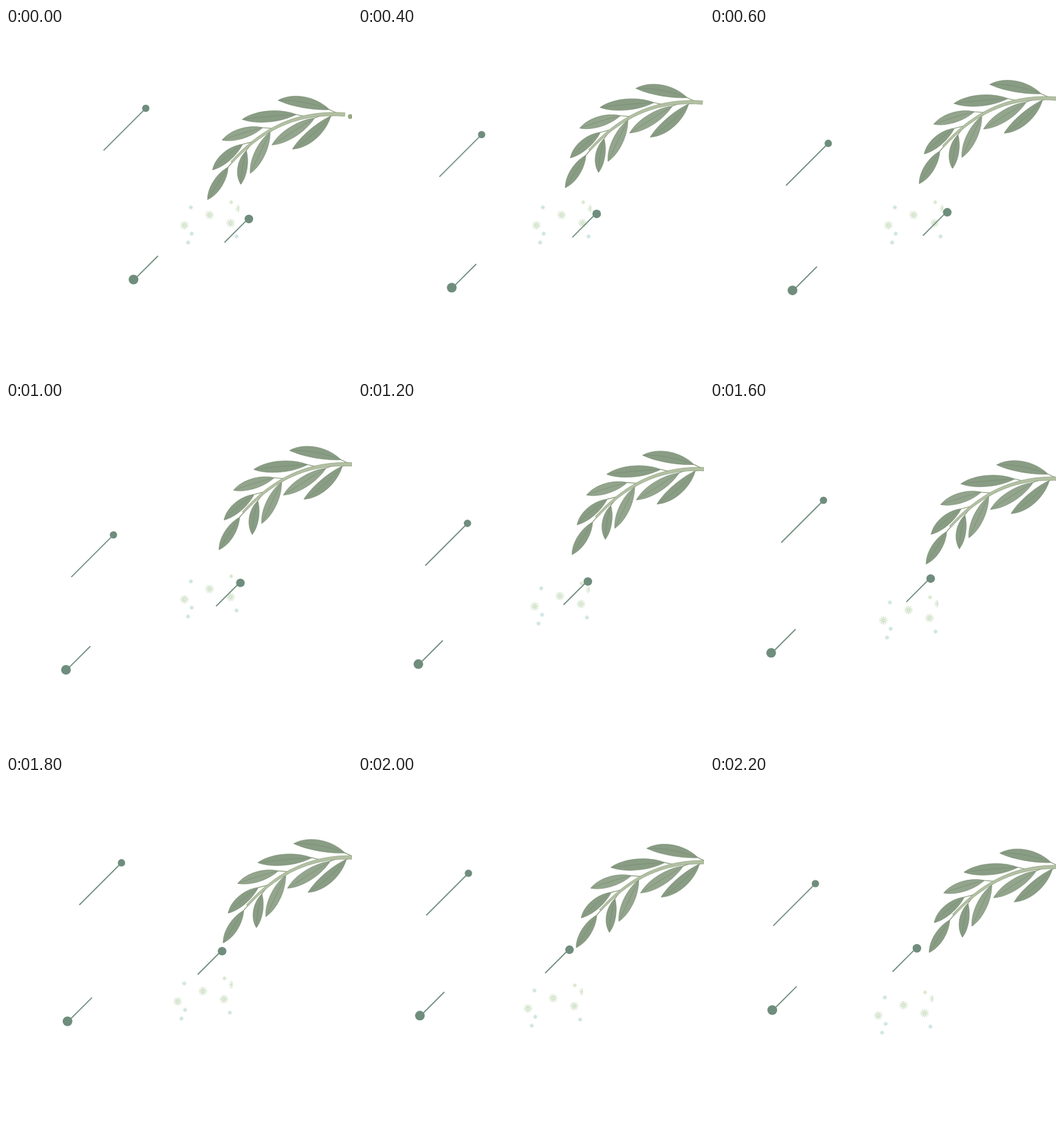
Recreate the animation shown at these times as an HTML page. Size 500 px wide and 500 px high, loop 3200 ms.

```html
<!DOCTYPE html>
<html lang="en">
<head>
<meta charset="utf-8">
<title>Olive branch</title>
<style>
  html, body { margin: 0; width: 100%; height: 100%; overflow: hidden; background: #fff; }
  svg { display: block; width: 100%; height: 100%; }
</style>
</head>
<body>
<svg id="stage" viewBox="0 0 500 500"></svg>
<script>
const LOOP = 3200, STEP = 200, LAST = 11;
const GREEN = '#6f8d7d';
const stage = document.getElementById('stage');

function add(parent, tag, attrs = {}) {
  const el = document.createElementNS('http://www.w3.org/2000/svg', tag);
  for (const key in attrs) el.setAttribute(key, attrs[key]);
  return parent.appendChild(el);
}

function stroke(parent, d, color, width) {
  return add(parent, 'path', { d, stroke: color, 'stroke-width': width, fill: 'none' });
}

// Starburst of thin rays; the small ones have a soft core
function flake(parent, x, y, r, color) {
  const big = r > 4, rays = big ? 12 : 8;
  let d = '';
  for (let i = 0; i < rays; i++) {
    const c = Math.cos(i * 2 * Math.PI / rays), s = Math.sin(i * 2 * Math.PI / rays);
    d += `M${x + c} ${y + s}L${x + c * r} ${y + s * r}`;
  }
  stroke(parent, d, color, 0.85);
  if (!big) add(parent, 'circle', { cx: x, cy: y, r: r * 0.6, fill: color, opacity: 0.6 });
}

function flakes() {
  const g = add(stage, 'g');
  const clip = add(add(g, 'defs'), 'clipPath', { id: 'edge' });
  add(clip, 'rect', { x: 240, y: 240, width: 97.2, height: 90 });
  const inner = add(g, 'g', { 'clip-path': 'url(#edge)' });
  for (const [x, y] of [[257.8, 285.2], [294.2, 270.2], [324.6, 281.8], [338, 261]]) {
    flake(inner, x, y, 6.2, '#bdd6b2');
  }
  for (const [x, y] of [[267.2, 259.2], [268.4, 297.3], [263.2, 310], [333.2, 301.3]]) {
    flake(inner, x, y, 3.3, '#bcdcda');
  }
  flake(inner, 325.4, 251.8, 3, '#cbdfb7');
  return g;
}

// Pin: round head at x, y and a 45 degree needle ending at x + dx, y + dy
function pin(x, y, r, dx, dy) {
  const g = add(stage, 'g');
  const run = Math.min(Math.abs(dx), Math.abs(dy));
  const d = `M${x + dx} ${y + dy}l${-Math.sign(dx) * run} ${-Math.sign(dy) * run}`;
  stroke(g, d, GREEN, 1.7);
  add(g, 'circle', { cx: x, cy: y, r, fill: GREEN });
  return g;
}

// Point on the stem, t = 0 at the thin end and 1 at the cut end
function stem(t) {
  const s = 1 - t;
  const mix = (a, b, c, d) => s * s * s * a + 3 * s * s * t * b + 3 * s * t * t * c + t * t * t * d;
  return [mix(326, 375, 430, 500), mix(194, 140, 118, 126)];
}

function stemPath() {
  const upper = [], lower = [];
  for (let t = 0; t <= 1; t += 0.05) {
    const [x, y] = stem(t), [x2, y2] = stem(t + 0.01);
    const k = (1.5 + 1.1 * t) / Math.hypot(x2 - x, y2 - y);
    const nx = (y2 - y) * k, ny = (x - x2) * k;
    upper.push([x + nx, y + ny]);
    lower.unshift([x - nx, y - ny]);
  }
  return `M${upper.concat(lower).join('L')}Z`;
}

// Twig from a leaf base to the stem, a little towards its root
function twig(x, y) {
  let best = 0, near = Infinity;
  for (let t = 0; t < 1; t += 0.01) {
    const [sx, sy] = stem(t), dist = Math.hypot(sx - x, sy - y);
    if (dist < near) { near = dist; best = t; }
  }
  return `M${x} ${y}L${stem(Math.min(1, best + 0.07))}`;
}

// Leaf between tip and base; bow bends it sideways
function leaf(parent, tx, ty, bx, by, bow, fill) {
  const dx = bx - tx, dy = by - ty, len = Math.hypot(dx, dy);
  const half = 6.3 + len * 0.055;
  const at = (k, off) => `${tx + dx * k + dy / len * off} ${ty + dy * k - dx / len * off}`;
  const edge = off => `M${tx} ${ty}C${at(0.25, off)} ${at(0.7, off)} ${bx} ${by}`;
  const back = `C${at(0.7, bow - half)} ${at(0.25, bow - half)} ${tx} ${ty}Z`;
  add(parent, 'path', { d: edge(bow + half) + back, fill, stroke: '#768a70', 'stroke-width': 0.6 });
  stroke(parent, edge(bow), '#748870', 0.6);
}

function branch() {
  const g = add(stage, 'g');
  const dark = '#899c84', light = '#93a58d';
  const leaves = [
    [393.3, 104.5, 467.5, 118, 5, dark],
    [341.5, 132, 419.5, 125, 1, dark],
    [312.3, 162, 371, 144, 1, light],
    [298.5, 205, 342, 168, 2, dark],
    [291.3, 248, 321, 201, 0, dark],
    [339.3, 226, 347.3, 177, 2, dark],
    [353, 210, 381.7, 150, 0, light],
    [384.3, 169, 446, 130, 0, light],
    [414, 175, 469.5, 127, -4, dark]
  ];
  for (const l of leaves) {
    stroke(g, twig(l[2], l[3]), '#8b9a7a', 1.2);
    leaf(g, ...l);
  }
  add(g, 'circle', { cx: 497.5, cy: 128, r: 3.4, fill: '#98a880' });
  add(g, 'path', { d: stemPath(), fill: '#b3c0a3', stroke: '#8f9f80', 'stroke-width': 0.7 });
  return g;
}

// Each key is [step, dx, dy]; every part starts at [0, 0, 0]
const parts = [
  { el: flakes(), keys: [[6, 0, 0], [12, -14.6, 60.9]] },
  { el: branch(), keys: [[6, 16.6, -34.5], [12, 25.5, 7]] },
  { el: pin(202, 116, 5.3, -61, 61), keys: [[6, -46.7, 76], [10, -35.1, 9.4], [12, -49.7, 39.5]] },
  { el: pin(351, 276, 6.2, -35.2, 33.8), keys: [[6, -12.2, -14.6], [12, -52, -27]] },
  { el: pin(184.3, 363.5, 7, 35.3, -34.2), keys: [[6, -97.6, 23.5], [12, -94.3, -25.3]] }
];

function offset(keys, u) {
  let [u0, x0, y0] = [0, 0, 0];
  for (const [u1, x1, y1] of keys) {
    if (u <= u1) {
      const f = (u - u0) / (u1 - u0);
      return [x0 + (x1 - x0) * f, y0 + (y1 - y0) * f];
    }
    [u0, x0, y0] = [u1, x1, y1];
  }
  return [x0, y0];
}

function draw(ms) {
  const n = Math.min(LAST, Math.floor(ms % LOOP / STEP));
  const u = n > 1 ? n + 1 : n; // one step is skipped early on
  for (const { el, keys } of parts) {
    el.setAttribute('transform', `translate(${offset(keys, u).join(' ')})`);
  }
}

const start = performance.now();
function tick() {
  draw(performance.now() - start);
  requestAnimationFrame(tick);
}
tick();
</script>
</body>
</html>
```
